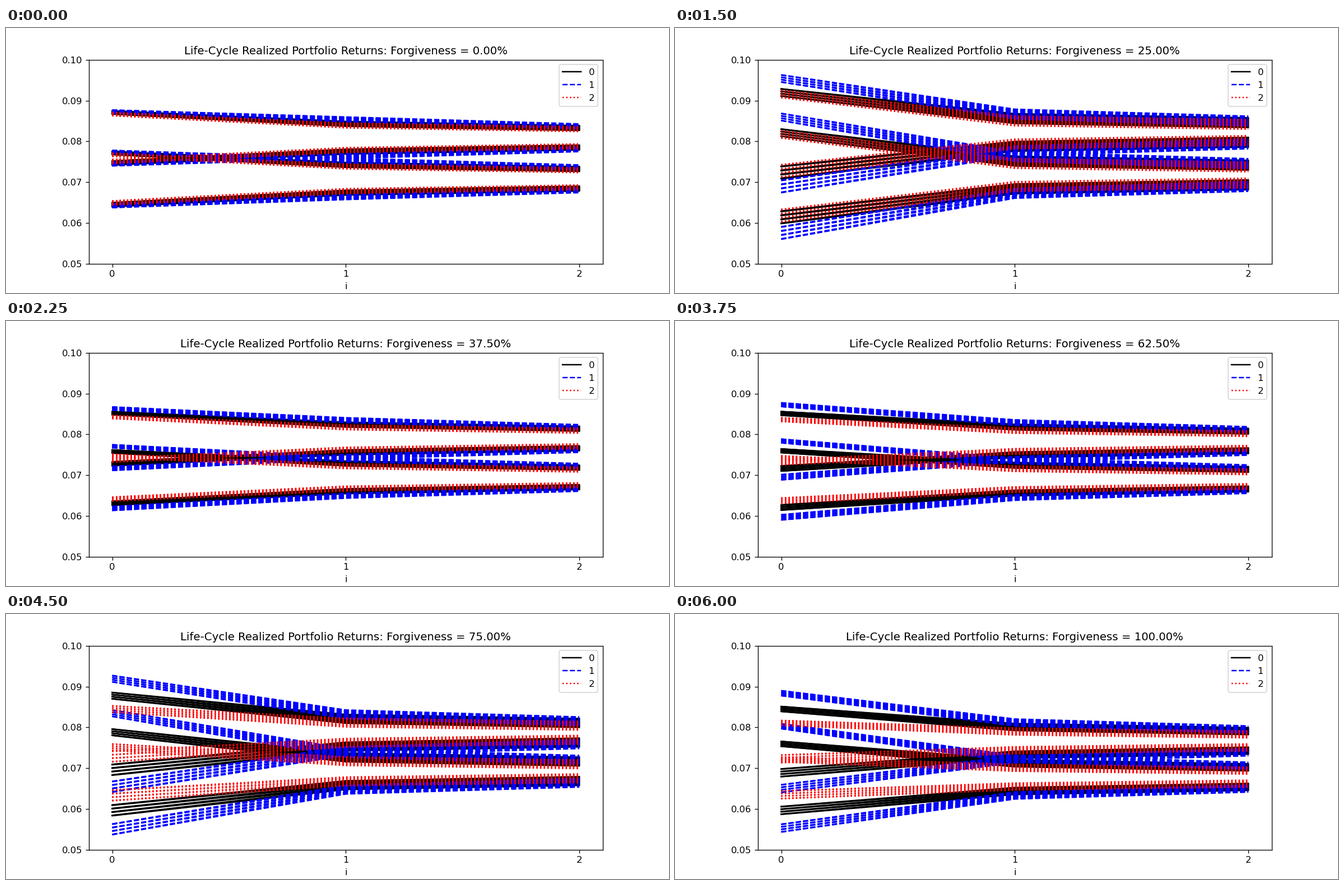
Write a matplotlib script that moves like this. It is 1183 px wide and 473 px high and loops after 6750 ms.

```python
import matplotlib.pyplot as plt
import numpy as np
from matplotlib.animation import FuncAnimation

W, H, DPI = 1183, 473, 118.3
UNIT = 1e-4
STYLES = ["k-", "b--", "r:"]

# Mean return and size of the initial gap at each forgiveness step.
LEVELS = [809, 815, 822, 790, 787, 784, 787, 777, 767]
SHOCKS = [0, .85, 1, 0, .05, .15, .8, .65, .45]
STEPS = len(LEVELS)

# Lines start in four clusters and fan out evenly later.
EVEN = np.linspace(1, -1, 12)
CLUSTERED = .25 * EVEN + .75 * np.repeat(np.linspace(1, -1, 4), 3)
OFFSETS = np.column_stack([CLUSTERED, EVEN, EVEN])


def distances(share, shock):
    """Distance of the paths from the mean at i = 0, 1, 2, per series."""
    return np.array([
        [62 + 36 * shock, 34, 24],
        [64 + 25 * share + 62 * shock, 45, 28],
        [58 - 14 * share + 53 * shock * (1 - share), 30 - 7 * share, 21 - 5 * share],
    ])


def bundles(level, shock, distance):
    """Centre and half width of the four bundles of one series."""
    gap = 95 + .28 * (level - 789)
    skew = np.array([.12 * (distance[0] - 50), 0, 0])
    high, low = level + distance, level - distance
    later = 6 + 6 * shock
    upper = np.array([4 + 5 * shock, later, later])
    lower = np.array([5 + 10.5 * shock, later, later])
    return [(high, upper), (high - gap + skew, upper),
            (low, lower), (low - gap - skew, lower)]


fig, ax = plt.subplots(figsize=((W + .001) / DPI, (H + .001) / DPI), dpi=DPI)
lines = [[[ax.plot([0, 1, 2], [0, 0, 0], style)[0] for _ in OFFSETS]
          for _ in range(4)] for style in STYLES]
ax.set_xlim(-.1, 2.1)
ax.set_ylim(.05, .10)
ax.set_xticks([0, 1, 2])
ax.set_xlabel("i")
ax.legend([group[0][0] for group in lines], ["0", "1", "2"], loc="upper right")
title = ax.set_title("")


def draw(step):
    share = step / (STEPS - 1)
    level, shock = LEVELS[step], SHOCKS[step]
    for group, distance in zip(lines, distances(share, shock)):
        for bundle, (centre, width) in zip(group, bundles(level, shock, distance)):
            for line, offset in zip(bundle, OFFSETS):
                line.set_ydata((centre + offset * width) * UNIT)
    title.set_text(f"Life-Cycle Realized Portfolio Returns: Forgiveness = {share:.2%}")
    return []


anim = FuncAnimation(fig, draw, frames=STEPS, interval=750,
                     repeat=True, repeat_delay=0, blit=False)
plt.show()
```
